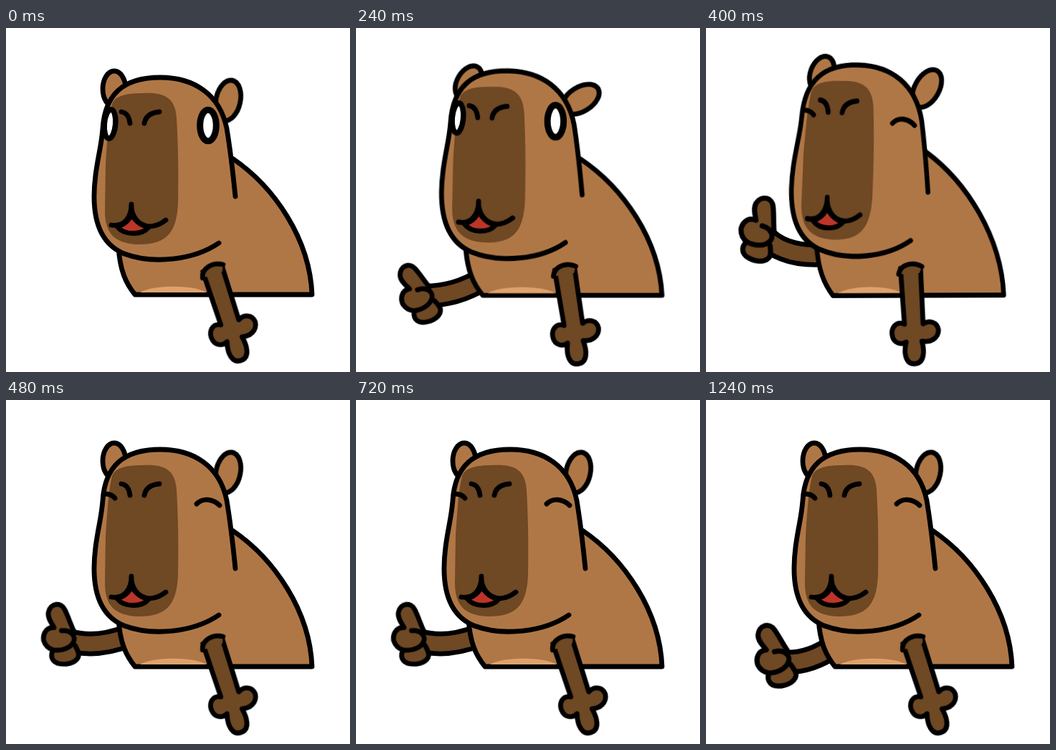
An HTML page without scripts that plays this animation: 480 px wide and 480 px high, repeating every 1.28 s.

```html
<!DOCTYPE html>
<html lang="en">
<head>
<meta charset="utf-8">
<title>Capybara thumbs up</title>
<style>
  html, body { margin: 0; width: 100%; height: 100%; overflow: hidden; background: #fff; }
  svg { display: block; width: 100%; height: 100%; }

  .line, .skin, .dark, .lip {
    stroke: #000; stroke-width: 6.8; stroke-linecap: round; stroke-linejoin: round;
  }
  .line { fill: none; }
  .skin { fill: #b07746; }
  .dark { fill: #6f4824; }
  .lip { fill: #bd3529; }
  .white { fill: #fff; stroke: #000; }
  .limb { fill: none; }
  .outer { stroke: #000; stroke-width: 34.5; }
  .inner { stroke: #6f4824; stroke-width: 21; }

  /* poses hold like drawn frames; steps(3) spreads a move over 40 ms drawings */
  .body, .head, .ear-l, .ear-r, .arm, .limb, .hand, .thumb, .open, .shut {
    animation: 1280ms step-end infinite;
  }
  .body { animation-name: body; }
  .head { animation-name: head; }
  .ear-l { animation-name: ear-l; }
  .ear-r { animation-name: ear-r; }
  .arm { animation-name: arm; }
  .limb { animation-name: limb; }
  .hand { animation-name: hand; }
  .thumb { animation-name: thumb; }
  .open { animation-name: open; }
  .shut { animation-name: shut; }

  @keyframes body {
    0%, 37.5%, 100% { transform: matrix(1, 0, 0, 1, 0, 0); }
    6.25% { transform: matrix(1, 0, 0, 1, 0, 0); animation-timing-function: steps(3); }
    15.625% { transform: matrix(1.006, 0, -.002, .99, 0, 3.3); }
    18.75% { transform: matrix(1.012, 0, .008, 1.002, -8.2, .3); }
    25% { transform: matrix(.947, -.004, .0147, 1.081, 0, -27.4); }
    28.125% { transform: matrix(.947, -.004, .0147, 1.081, 0, -27.4); animation-timing-function: steps(3); }
  }
  @keyframes head {
    0%, 37.5%, 100% { transform: matrix(1, 0, 0, 1, 0, 0); }
    6.25% { transform: matrix(1, 0, 0, 1, 0, 0); animation-timing-function: steps(3); }
    15.625% { transform: matrix(1.006, -.006, .005, .993, -1.4, 4.6); }
    18.75% { transform: matrix(.996, .018, -.007, 1.03, -1.5, -15); }
    25% { transform: matrix(.95, .043, -.045, 1.075, 10.8, -40.7); }
    28.125% { transform: matrix(.95, .043, -.045, 1.075, 10.8, -40.7); animation-timing-function: steps(3); }
  }
  @keyframes ear-l {
    0%, 37.5%, 100% { transform: translate(151px, 85px) rotate(0deg); }
    6.25% { transform: translate(151px, 85px) rotate(0deg); animation-timing-function: steps(3); }
    15.625% { transform: translate(151px, 88px) rotate(0deg); }
    18.75% { transform: translate(157px, 76px) rotate(30deg); }
    25% { transform: translate(167px, 53px) rotate(30deg); }
    28.125% { transform: translate(167px, 53px) rotate(30deg); animation-timing-function: steps(3); }
  }
  @keyframes ear-r {
    0%, 37.5%, 100% { transform: translate(310px, 101px) rotate(12deg); }
    6.25% { transform: translate(310px, 101px) rotate(12deg); animation-timing-function: steps(3); }
    15.625% { transform: translate(311px, 104px) rotate(16deg); }
    18.75% { transform: translate(313.5px, 99.5px) rotate(58deg); }
    25% { transform: translate(307.5px, 76px) rotate(38deg); }
    28.125% { transform: translate(307.5px, 76px) rotate(38deg); animation-timing-function: steps(3); }
  }
  @keyframes arm {
    0%, 37.5%, 100% { transform: translate(288px, 336px) rotate(-18deg); }
    6.25% { transform: translate(288px, 336px) rotate(-18deg); animation-timing-function: steps(3); }
    15.625% { transform: translate(290px, 337px) rotate(-17deg); }
    18.75% { transform: translate(291px, 336px) rotate(-9deg); }
    25% { transform: translate(284px, 334px) rotate(4deg); }
    28.125% { transform: translate(284px, 334px) rotate(4deg); animation-timing-function: steps(3); }
  }
  @keyframes limb {
    0%, 100% { d: path("M110 386Q145 382 178 358"); }
    18.75% { d: path("M95 374Q140 374 178 350"); }
    25% { d: path("M75 265Q100 308 167 309"); }
    28.125% { d: path("M75 265Q100 308 167 309"); animation-timing-function: steps(3); }
    37.5% { d: path("M88 336Q125 347 172 329"); }
    90.625% { d: path("M85 325Q125 336 172 326"); animation-timing-function: steps(2); }
    96.875% { d: path("M98 365Q140 371 178 344"); }
  }
  @keyframes hand {
    0%, 100% { transform: translate(98px, 385px) rotate(-24deg) scale(1); }
    18.75% { transform: translate(85px, 372px) rotate(-20deg) scale(1); }
    25% { transform: translate(73px, 258px) rotate(26deg) scale(1.07); }
    28.125% { transform: translate(73px, 258px) rotate(26deg) scale(1.07); animation-timing-function: steps(3); }
    37.5% { transform: translate(75px, 328px) rotate(-5deg) scale(1); }
    90.625% { transform: translate(75px, 315px) rotate(0deg) scale(1); animation-timing-function: steps(2); }
    96.875% { transform: translate(94px, 358px) rotate(-14deg) scale(1.04); }
  }
  @keyframes thumb {
    0%, 100% { opacity: 0; }
    15.625% { opacity: 1; }
  }
  @keyframes open {
    0%, 100% { opacity: 1; }
    25% { opacity: 0; }
  }
  @keyframes shut {
    0%, 100% { opacity: 0; }
    25% { opacity: 1; }
  }
</style>
</head>
<body>
<svg viewBox="0 0 480 480">
  <ellipse class="skin ear-l" rx="16" ry="25"/>
  <ellipse class="skin ear-r" rx="17" ry="28.5"/>

  <g class="thumb">
    <path class="limb outer" d="M85 325Q125 336 172 326"/>
    <path class="limb inner" d="M85 325Q125 336 172 326"/>
    <g class="hand">
      <path class="dark" d="M20-4C16-15 14-25 10-35C6-46-9-46-13-33C-15-25-10-18-7-11
        C-18-13-24-3-23 6C-21 14-16 18-11 20C-16 27-15 37-3 40C10 43 22 39 24 30C24 25 22 21 20 16"/>
      <path class="line" d="M3-6C17-6 24 5 17 13C11 21-3 22-11 20"/>
    </g>
  </g>

  <g class="body">
    <path class="skin" d="M316 182C375 222 424 295 427 372H180C167 356 159 338 157 306"/>
    <path fill="#dfa26d" d="M187 369C205 358 262 358 280 369Z"/>
  </g>

  <g class="head">
    <path class="skin" d="M297 300C262 324 205 330 165 315C128 300 118 260 125 205
      C129 175 133 165 135 140C138 93 163 69 215 69C262 69 298 92 308 140C313 170 317 205 320 235"/>
    <path fill="#6f4824" d="M190 91C222 89 236 98 238 125C240 160 241 200 240 245
      C238 285 225 302 185 302C150 301 138 285 138 255L139 190C141 160 143 125 148 106C152 94 170 91 190 91"/>
    <path class="line" d="M161 117C169 118 172 125 173 133M193 133C195 122 203 118 214 117"/>
    <path class="lip" d="M155 277C168 274 174 265 175 258C178 268 188 276 199 278C190 289 165 290 155 277Z"/>
    <path class="line" d="M147 275C165 278 175 264 175 246C174 270 197 288 223 268"/>
    <g class="open">
      <ellipse class="white" cx="145" cy="134" rx="7.7" ry="20.3" stroke-width="7.5" transform="rotate(5 145 134)"/>
      <ellipse class="white" cx="282" cy="136" rx="11.3" ry="21.7" stroke-width="9"/>
    </g>
    <path class="line shut" d="M138 131C144 131 149 133 152 137M266 145C275 136 289 138 298 147"/>
  </g>

  <g class="arm">
    <path class="dark" d="M-14 0L-13 78C-24 72-32 82-31 92C-30 104-19 107-12 103C-17 119-14 134-2 134
      C12 134 13 117 10 103C21 106 33 101 34 89C33 77 21 74 13 79L14 0"/>
    <path fill="#6f4824" d="M-17 8C-14-6 4-9 16-1L12 8H-12Z"/>
    <path class="line" d="M-17 8C-14-6 4-9 16-1"/>
  </g>
</svg>
</body>
</html>
```
